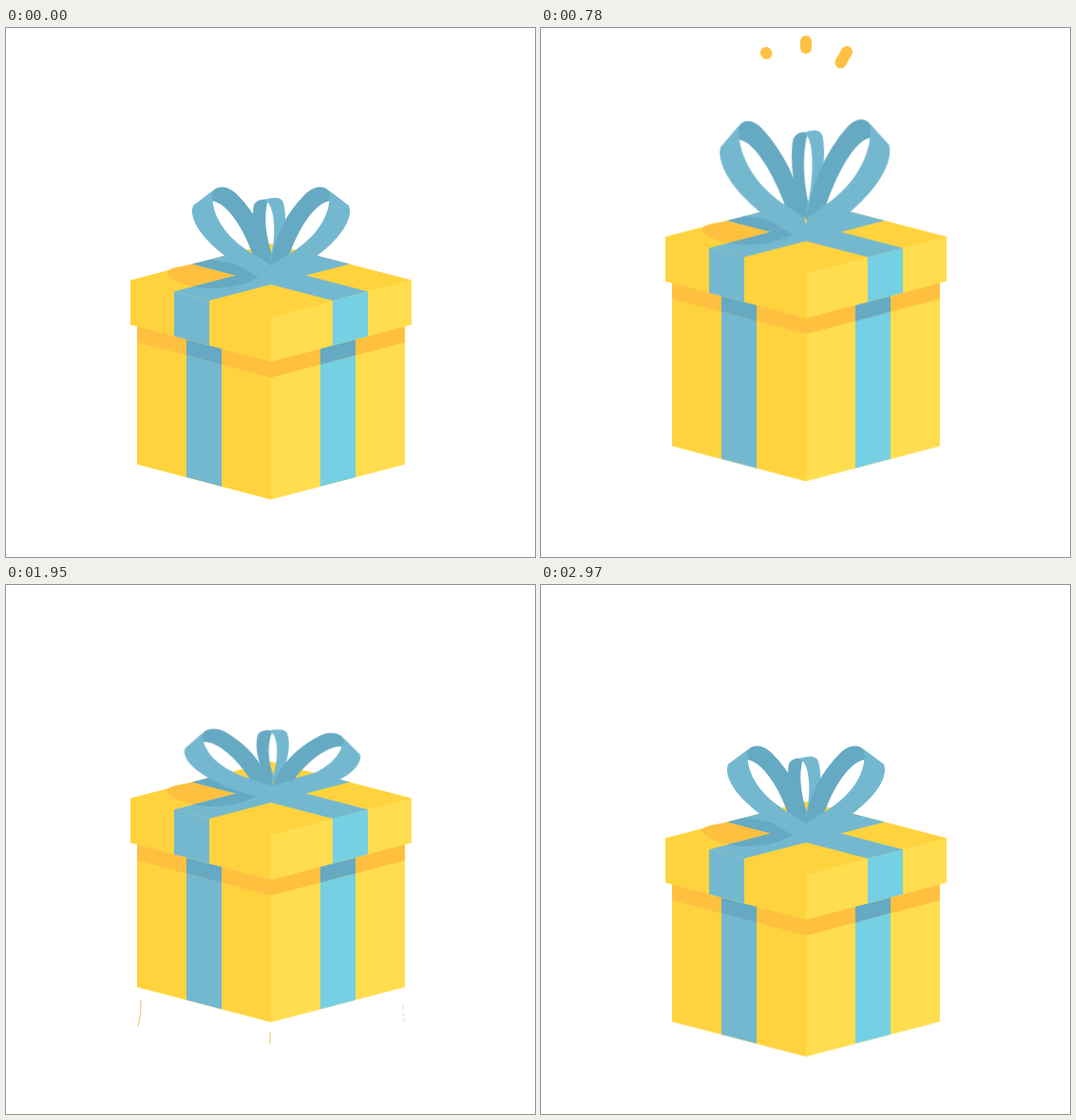
Write an HTML page without scripts that moves like this. It is 557x557 px and loops after 3000 ms.

```html
<!DOCTYPE html>
<html lang="en">
<head>
<meta charset="utf-8">
<title>Jumping gift box</title>
<style>
  html, body { margin: 0; width: 100%; height: 100%; overflow: hidden; background: #fff; }
  svg { display: block; width: 557px; height: 557px; }

  .gold { fill: #ffd33e; }
  .pale { fill: #ffdd4f; }
  .amber { fill: #ffc040; }
  .band { fill: #74b8d0; }
  .aqua { fill: #74d0e2; }
  .deep { fill: #65a9c3; }

  /* One hop takes 1530 ms; the second is cut short when the 3 s loop ends. */
  .hop { --d: 0ms; animation: first 3s step-end infinite; }
  .late { --d: -1470ms; animation-name: second; }
  .box, .lid, .bow, .trail, .ray, .dust {
    animation: 3s ease-in-out var(--d) infinite;
  }
  .box { animation-name: box; transform-origin: 279px 496.5px; }
  .lid { animation-name: lid; }
  .bow { animation-name: bow; transform-origin: 279px 262px; }
  .left { --a: -9deg; --b: -5deg; }
  .right { --a: 13deg; --b: 3.4deg; }
  .mid { --a: 4deg; --b: 2.7deg; }

  .trail, .ray, .dust { fill: none; opacity: 0; }
  .trail { animation-name: trail; animation-timing-function: step-end; }
  .ray {
    animation-name: ray; animation-timing-function: linear;
    animation-delay: calc(var(--d) + var(--lag));
    stroke: #ffc144; stroke-width: 12; stroke-linecap: round; stroke-dasharray: 1 2;
  }
  .dust { animation-name: dust; stroke: #ececec; stroke-width: 1; }

  @keyframes first { 0% { visibility: visible; } 51%, 100% { visibility: hidden; } }
  @keyframes second { 0% { visibility: hidden; } 51%, 100% { visibility: visible; } }

  @keyframes box {
    0%, 1.5% { transform: none; }
    9% { transform: translateY(0) scaleY(.797); }
    10% { transform: translateY(0) scaleY(.797); animation-timing-function: ease-in; }
    12.5% { transform: translateY(0) scaleY(1); animation-timing-function: linear; }
    14% { transform: translateY(-35.4px) scaleY(1); animation-timing-function: cubic-bezier(.33, .67, .67, 1); }
    19.67% { transform: translateY(-100px) scaleY(1); animation-timing-function: cubic-bezier(.33, 0, .67, .33); }
    26% { transform: translateY(-20.2px) scaleY(1); animation-timing-function: linear; }
    26.73% { transform: translateY(0) scaleY(1); }
    28% { transform: translateY(0) scaleY(1); animation-timing-function: ease-out; }
    30.5% { transform: translateY(0) scaleY(.8); }
    36% { transform: translateY(0) scaleY(1.045); }
    42% { transform: translateY(0) scaleY(1.01); }
    48% { transform: translateY(0) scaleY(.993); }
    51%, 100% { transform: none; }
  }
  @keyframes lid {
    0%, 1.5% { transform: translateY(0); }
    9% { transform: translateY(29.5px); }
    10% { transform: translateY(29.5px); animation-timing-function: ease-in; }
    12.5% { transform: translateY(-2px); animation-timing-function: linear; }
    14% { transform: translateY(-40.3px); animation-timing-function: cubic-bezier(.33, .67, .67, 1); }
    19.67% { transform: translateY(-104px); animation-timing-function: cubic-bezier(.33, 0, .67, .33); }
    26% { transform: translateY(-46.4px); animation-timing-function: linear; }
    28.4% { transform: translateY(0); animation-timing-function: ease-out; }
    30.5% { transform: translateY(29px); }
    36% { transform: translateY(-7px); }
    42% { transform: translateY(-1.5px); }
    48% { transform: translateY(1px); }
    51%, 100% { transform: translateY(0); }
  }
  @keyframes bow {
    0%, 1.5% { transform: rotate(0deg) scaleY(1); }
    9%, 10% { transform: rotate(0deg) scaleY(1.215); }
    14% { transform: rotate(var(--a)) scaleY(.83); }
    19.67% { transform: rotate(0deg) scaleY(1); }
    26% { transform: rotate(var(--b)) scaleY(1.305); }
    30.5% { transform: rotate(var(--a)) scaleY(.83); }
    36% { transform: rotate(0deg) scaleY(1.09); }
    38% { transform: rotate(0deg) scaleY(1.08); }
    42% { transform: rotate(0deg) scaleY(1.04); }
    48% { transform: rotate(0deg) scaleY(.99); }
    51%, 100% { transform: rotate(0deg) scaleY(1); }
  }
  @keyframes trail { 0% { opacity: 0; } 13.2% { opacity: 1; } 14.8%, 100% { opacity: 0; } }
  @keyframes ray {
    0%, 16.9% { opacity: 0; stroke-dashoffset: 1; }
    17% { opacity: 1; stroke-dashoffset: 1; }
    21.5% { opacity: 1; stroke-dashoffset: 0; }
    26.2% { opacity: 1; stroke-dashoffset: -1; }
    26.3%, 100% { opacity: 0; stroke-dashoffset: -1; }
  }
  @keyframes dust {
    0%, 27% { opacity: 0; transform: none; }
    29% { opacity: 1; }
    40.5%, 100% { opacity: 0; transform: translateY(-10px); }
  }
</style>
</head>
<body>
<svg viewBox="0 0 557 557" role="img" aria-label="A gift box hops">
  <defs>
    <path id="cross" d="M177 277.5 325 239 362 248.5 214 287Z M381 277.5 344 287 196 248.5 233 239Z"/>
    <clipPath id="onCross"><use href="#cross"/></clipPath>
    <path id="shade" d="M170 258C172 268 200 275 222 274C245 273 262 266 272 258C255 252 235 246 215 244L190 250C178 252 169 254 170 258Z"/>

    <g id="box">
      <path class="gold" d="M138 275 279 312V496.5L138 459.5Z"/>
      <path class="pale" d="M279 312 420 275V459.5L279 496.5Z"/>
      <path class="band" d="M190 288.6 227 298.4V482.8L190 473.1Z"/>
      <path class="aqua" d="M331 298.4 368 288.6V473.1L331 482.8Z"/>
    </g>

    <g id="lid">
      <path class="amber" d="M138 300 279 340 420 300V331L279 368 138 331Z"/>
      <path class="deep" d="M190 310H227V354.4L190 344.6Z M331 310H368V344.6L331 354.4Z"/>
      <path class="gold" d="M131 265.5 279 227 427 265.5 279 351.5 131 312.5Z"/>
      <path class="pale" d="M279 304 427 265.5V312.5L279 351.5Z"/>
      <use class="amber" href="#shade"/>
      <use class="band" href="#cross"/>
      <g clip-path="url(#onCross)"><use class="deep" href="#shade"/></g>
      <path class="band" d="M177 277.5 214 287V334.3L177 324.6Z"/>
      <path class="aqua" d="M344 287 381 277.5V324.6L344 334.3Z"/>
    </g>

    <g id="loop">
      <path class="deep" d="M217 173C222 165 234 166 243 175C264 196 276 222 279 246V258L261 242C251 212 233 184 217 182Z"/>
      <path class="band" d="M197 187 218 171C214 196 232 222 262 239L279 250V268C254 259 194 221 196 191Z"/>
    </g>
    <use id="mirror" href="#loop" transform="matrix(-1 0 0 1 558 0)"/>
    <g id="mid">
      <path class="deep" d="M261 186Q266 179 276 181C270 200 275 225 281 240L279 252C266 235 257 205 261 186Z"/>
      <path class="band" d="M272 181C280 178 290 177 292 184C298 205 291 232 283 247L278 244C285 220 283 192 276 184Z"/>
    </g>

    <g id="trail">
      <path stroke="#e6c85a" d="M142 437Q143 450 139 465M278 470V483"/>
      <path stroke="#dcdcdc" stroke-dasharray="4 3" d="M418 443Q418 455 421 465"/>
    </g>
    <path id="dust" d="M112 500Q75 498 56 520M130 520Q110 524 100 543M446 500Q475 498 493 520M428 520Q448 524 458 543"/>
  </defs>

  <g class="hop">
    <use class="trail" href="#trail"/>
    <use class="dust" href="#dust"/>
    <use class="box" href="#box"/>
    <g class="lid">
      <use href="#lid"/>
      <g class="bow mid"><use href="#mid"/></g>
      <g class="bow left"><use href="#loop"/></g>
      <g class="bow right"><use href="#mirror"/></g>
    </g>
    <path class="ray" style="--lag:0ms" pathLength="1" d="M250 50 237 26"/>
    <path class="ray" style="--lag:30ms" pathLength="1" d="M279 42V14"/>
    <path class="ray" style="--lag:60ms" pathLength="1" d="M308 50 322 25"/>
  </g>

  <g class="hop late">
    <use class="trail" href="#trail"/>
    <use class="dust" href="#dust"/>
    <use class="box" href="#box"/>
    <g class="lid">
      <use href="#lid"/>
      <g class="bow mid"><use href="#mid"/></g>
      <g class="bow left"><use href="#loop"/></g>
      <g class="bow right"><use href="#mirror"/></g>
    </g>
    <path class="ray" style="--lag:0ms" pathLength="1" d="M250 50 237 26"/>
    <path class="ray" style="--lag:30ms" pathLength="1" d="M279 42V14"/>
    <path class="ray" style="--lag:60ms" pathLength="1" d="M308 50 322 25"/>
  </g>
</svg>
</body>
</html>
```
